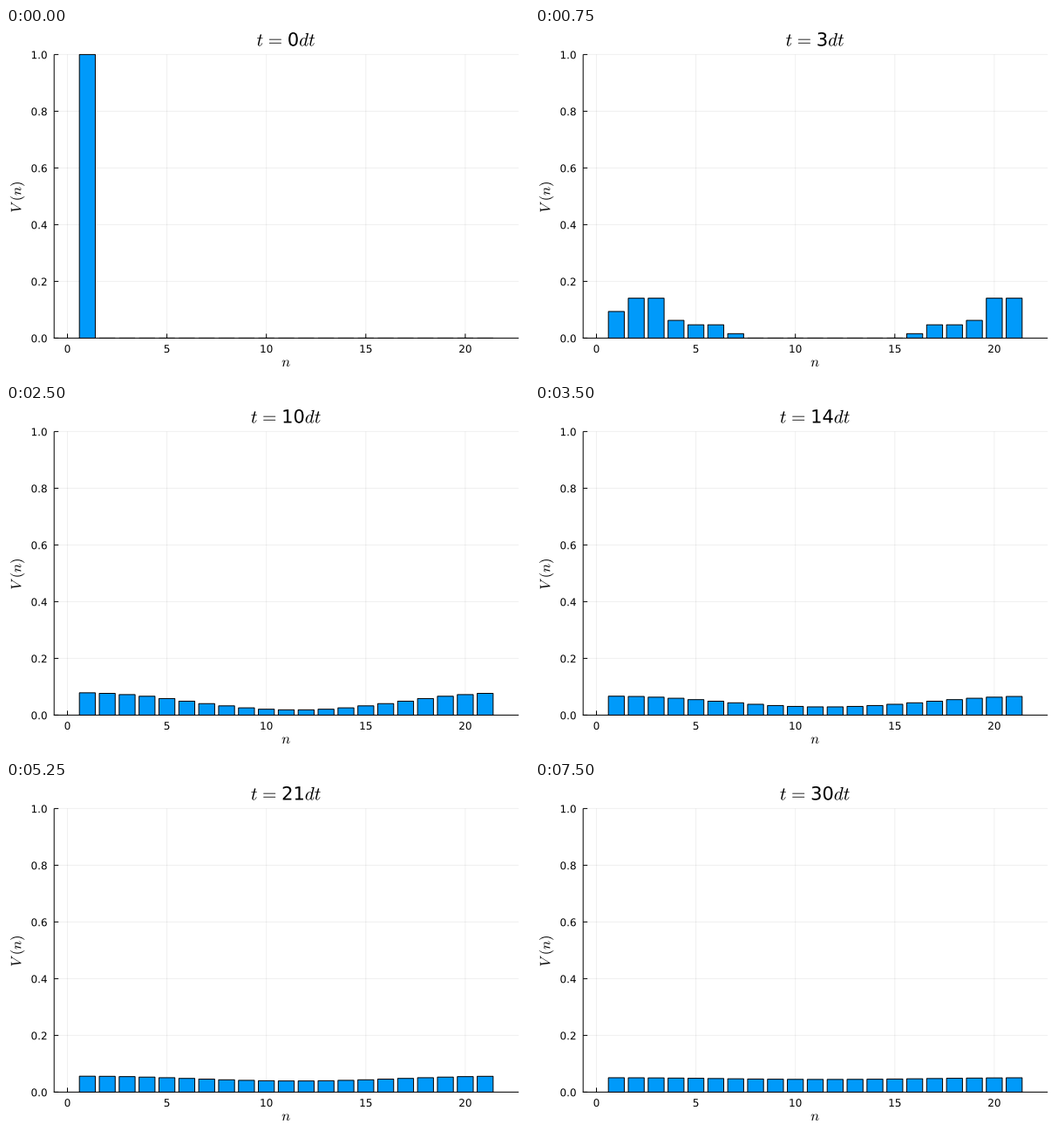
Animation of 600x400 px, one loop 7750 ms. Source, as a matplotlib script:

```python
import numpy as np
import matplotlib.pyplot as plt
from matplotlib.animation import FuncAnimation
from matplotlib.patches import PathPatch, Rectangle
from matplotlib.textpath import TextPath
from matplotlib.transforms import Affine2D

plt.rcParams.update({
    "font.family": "DejaVu Sans",
    "mathtext.fontset": "cm",
    "path.snap": False,
})

W, H, DPI = 600, 400, 100
PX = 72 / DPI                      # one pixel in points
LEFT, RIGHT, TOP, BASE = 55.2, 588.2, 30.4, 355.4
X0, STEP = 70.5, 22.82             # pixel of n = 0 and pixels per unit
SITES, STEPS = 21, 31
TICK = 5
DIGIT = 0.636                      # digit advance in em
TICK_SIZE, LABEL_SIZE, TITLE_SIZE = 12, 16.5, 21

fig = plt.figure(figsize=(W / DPI, H / DPI), dpi=DPI, facecolor="white")
ax = fig.add_axes([0, 0, 1, 1])
ax.set_xlim(0, W)
ax.set_ylim(H, 0)
ax.axis("off")


def text_path(s, x, y, size, centred=False, angle=0):
    """Outline of s with its baseline at y, starting or centred at x."""
    path = TextPath((0, 0), s, size=size)
    place = Affine2D()
    if centred:
        box = path.get_extents()
        place.translate(-(box.x0 + box.x1) / 2, 0)
    place.rotate_deg(angle).scale(1, -1).translate(x, y)
    return place.transform_path(path)


def add_text(*args, **kwargs):
    patch = PathPatch(text_path(*args, **kwargs), fc="black", lw=0, zorder=5)
    return ax.add_patch(patch)


def line(xs, ys, zorder=2, alpha=1):
    ax.plot(xs, ys, color="black", lw=PX, alpha=alpha, zorder=zorder,
            solid_capstyle="butt")


# Grid, ticks and tick labels
for n in range(0, 21, 5):
    x = X0 + STEP * n
    line([x, x], [TOP, BASE], 1, 0.06)
    line([x, x], [BASE, BASE - TICK])
    label = str(n)
    add_text(label, x - DIGIT * TICK_SIZE * len(label) / 2, 372, TICK_SIZE)

for v in np.arange(6) / 5:
    y = BASE + (TOP - BASE) * v
    line([LEFT, RIGHT], [y, y], 1, 0.06)
    line([LEFT, LEFT + TICK], [y, y])
    add_text(f"{v:.1f}", 28.5, y + 4.8, TICK_SIZE)

line([LEFT - 0.5, RIGHT], [BASE, BASE])
line([LEFT, LEFT], [TOP, BASE])

# Axis labels
add_text("$n$", 321.2, 388, LABEL_SIZE, centred=True)
add_text("$V$", 17.2, 204.9, LABEL_SIZE, centred=True, angle=90)
add_text("$(n)$", 17.2, 186.9, LABEL_SIZE, centred=True, angle=90)

bars = [
    ax.add_patch(Rectangle((X0 + STEP * (n - 0.4), BASE), 0.8 * STEP, 0,
                           fc="#009afa", ec="black", lw=PX, zorder=3))
    for n in range(1, SITES + 1)
]
title = [add_text("0", 0, 0, TITLE_SIZE) for _ in range(4)]

# Random walk on a ring: hops of one or two sites, all equally likely
walk = [np.eye(SITES)[0]]
for _ in range(STEPS - 1):
    walk.append(sum(np.roll(walk[-1], k) for k in (-2, -1, 1, 2)) / 4)


def title_paths(step):
    digits = str(step)
    extra = DIGIT * TITLE_SIZE * (len(digits) - 1)
    left, y = 287.4 - extra / 2, 20.5
    return [
        text_path("$t$", left + 3.9, y, TITLE_SIZE, centred=True),
        text_path("$=$", left + 21.5, y, TITLE_SIZE, centred=True),
        text_path(digits, left + 35.4, y, TITLE_SIZE),
        text_path("$dt$", left + 58.1 + extra, y, TITLE_SIZE, centred=True),
    ]


def draw(step):
    for bar, p in zip(bars, walk[step]):
        bar.set_height((TOP - BASE) * p)
    for patch, path in zip(title, title_paths(step)):
        patch.set_path(path)
    return bars + title


anim = FuncAnimation(fig, draw, frames=STEPS, interval=250,
                     init_func=lambda: draw(0), repeat=True, repeat_delay=0)
plt.show()
```
